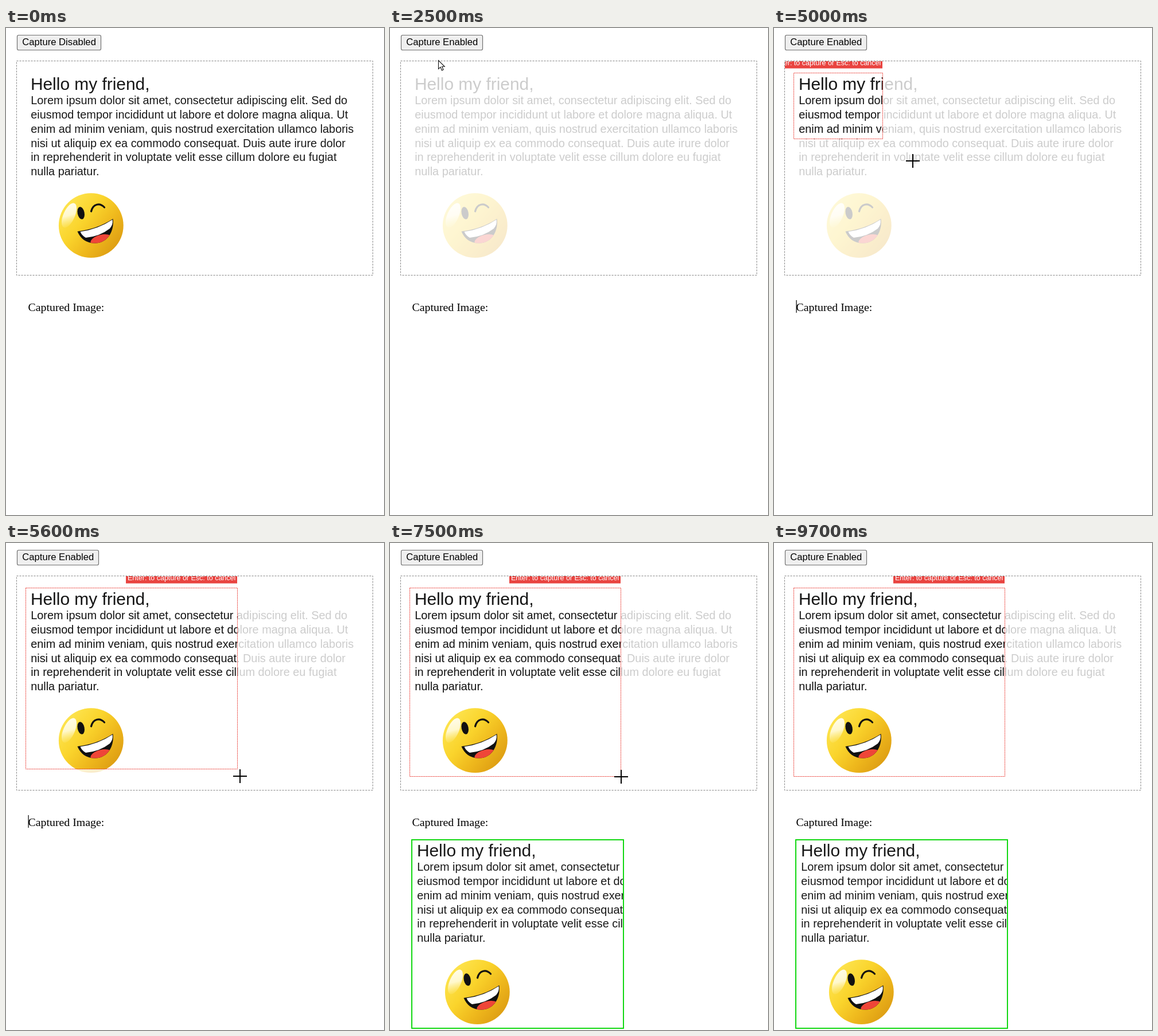
Animation of 659 by 850 pixels, one loop 9800 ms. Source, as an HTML page with a canvas:

```html
<!DOCTYPE html>
<html lang="en">
<head>
<meta charset="utf-8">
<title>Region capture</title>
<style>
  html, body { margin: 0; width: 100%; height: 100%; overflow: hidden; background: #fff; }
  canvas { display: block; }
</style>
</head>
<body>
<canvas id="stage" width="659" height="850"></canvas>
<script>
const ctx = document.getElementById('stage').getContext('2d');
const SANS = '"Liberation Sans", Arial, sans-serif';
const SERIF = '"Liberation Serif", "Times New Roman", serif';
const LOOP = 9800, STEP = 100;
const ENABLED = 2300, DRAG = 4600, CARET_OFF = 6600, CAPTURED = 7200, CROSS_OFF = 8400;
const ORIGIN = { x: 35, y: 79 };

const LINES = [
  'Lorem ipsum dolor sit amet, consectetur adipiscing elit. Sed do',
  'eiusmod tempor incididunt ut labore et dolore magna aliqua. Ut',
  'enim ad minim veniam, quis nostrud exercitation ullamco laboris',
  'nisi ut aliquip ex ea commodo consequat. Duis aute irure dolor',
  'in reprehenderit in voluptate velit esse cillum dolore eu fugiat',
  'nulla pariatur.'
];

// Pointer keys: time, x, y
const POINTER = [
  [900, 324, 474], [1100, 322, 472], [1400, 190, 200], [1700, 93, 31], [2300, 93, 31],
  [2700, 75, 80], [3100, 59, 97], [3800, 59, 97], [4200, 22, 75], [4400, 35, 79],
  [DRAG, 35, 79], [5000, 242, 232], [5400, 400, 384], [5700, 412, 418],
  [6100, 401, 404], [6300, 401, 404], [6500, 403, 408], [LOOP, 403, 408]
];

function pointerAt(t) {
  const i = Math.max(1, POINTER.findIndex(key => key[0] >= t));
  const [t0, x0, y0] = POINTER[i - 1], [t1, x1, y1] = POINTER[i];
  const k = Math.max(0, (t - t0) / (t1 - t0));
  return { x: Math.round(x0 + (x1 - x0) * k), y: Math.round(y0 + (y1 - y0) * k) };
}

function text(str, x, y, size, color = '#181818', family = SANS) {
  ctx.font = `${size}px ${family}`;
  ctx.fillStyle = color;
  ctx.fillText(str, x, y);
}

function fillPath(d, color) {
  ctx.fillStyle = color;
  ctx.fill(new Path2D(d));
}

function ellipse(x, y, rx, ry, angle, fill) {
  ctx.beginPath();
  ctx.ellipse(x, y, rx, ry, angle, 0, 2 * Math.PI);
  ctx.fillStyle = fill;
  ctx.fill();
}

function dashedRect(x, y, w, h, color, dash) {
  ctx.setLineDash(dash);
  ctx.lineWidth = 1;
  ctx.strokeStyle = color;
  ctx.strokeRect(x, y, w, h);
  ctx.setLineDash([]);
}

function clipped(x, y, w, h, draw) {
  ctx.save();
  ctx.beginPath();
  ctx.rect(x, y, w, h);
  ctx.clip();
  draw();
  ctx.restore();
}

function smiley() {
  const skin = ctx.createLinearGradient(106, 312, 190, 382);
  skin.addColorStop(0, '#fde24a');
  skin.addColorStop(0.35, '#fad42c');
  skin.addColorStop(0.7, '#eeb71c');
  skin.addColorStop(1, '#dfa014');
  ellipse(148.3, 344.7, 56.4, 56.4, 0, skin);
  const shine = ctx.createLinearGradient(102, 305, 114, 350);
  shine.addColorStop(0, '#fffdf0');
  shine.addColorStop(0.5, '#fff8cc');
  shine.addColorStop(1, '#fdec8800');
  ellipse(110, 327, 10, 23, 0.42, shine);
  ellipse(130.7, 323, 6, 11, -0.2, '#111');
  ctx.lineWidth = 3.2;
  ctx.lineCap = 'round';
  ctx.strokeStyle = '#111';
  ctx.stroke(new Path2D('M148.5 320C152 306 164 305 171.5 313'));
  ctx.lineCap = 'butt';
  const mouth = 'M124.5 355Q159 351 186.5 333C189 354 178 375 156 375.5C140 376 130 368 124.5 355Z';
  fillPath(mouth, '#111');
  ctx.save();
  ctx.clip(new Path2D(mouth));
  ellipse(166, 370, 19, 9, -0.25, '#ef4538');
  ctx.restore();
  fillPath('M129.5 355.5Q160 351.5 185.5 334.5Q187 343 181 350Q163 364 139 366Q132 362 129.5 355.5Z', '#fff');
}

function letter() {
  text('Hello my friend,', 42.9, 108, 29.9);
  LINES.forEach((line, i) => text(line, 43.2, 133 + i * 24.85, 19.86));
  smiley();
}

function button(label, width, fill) {
  ctx.beginPath();
  ctx.roundRect(19.5, 12.5, width, 26, 2.5);
  ctx.fillStyle = fill;
  ctx.fill();
  ctx.lineWidth = 1.2;
  ctx.strokeStyle = '#707070';
  ctx.stroke();
  text(label, 28.2, 30, 16.67, '#000');
}

function selection({ x, y }) {
  const w = x - ORIGIN.x, h = y - ORIGIN.y;
  clipped(ORIGIN.x, ORIGIN.y, w, h, letter);
  dashedRect(ORIGIN.x - 0.5, ORIGIN.y - 0.5, w, h, '#ea3f38', [2, 1]);
  clipped(19, 58, 620, 374, () => {
    ctx.fillStyle = '#e94440';
    ctx.fillRect(x - 195, 50, 194, 20.5);
    text('Enter: to capture or Esc: to cancel', x - 192, 65, 12.5, '#fff');
  });
}

function capturedImage() {
  ctx.save();
  ctx.translate(4, 439);
  clipped(35, 79, 368, 329, letter);
  ctx.restore();
  ctx.lineWidth = 2;
  ctx.strokeStyle = '#12d812';
  ctx.strokeRect(38, 518, 369, 329);
}

function arrow({ x, y }) {
  ctx.save();
  ctx.translate(x, y);
  const shape = new Path2D('M0.5 0.5V15.5L4 12.2L6.4 18L9 16.8L6.6 11.3H11.2Z');
  ctx.fillStyle = '#fff';
  ctx.fill(shape);
  ctx.lineWidth = 1.1;
  ctx.strokeStyle = '#111';
  ctx.stroke(shape);
  ctx.restore();
}

function crosshair({ x, y }) {
  ctx.fillStyle = '#000';
  ctx.fillRect(x - 12, y - 1, 24, 2);
  ctx.fillRect(x - 1, y - 12, 2, 24);
}

function draw(t) {
  const enabled = t >= ENABLED, pointer = pointerAt(t);
  ctx.fillStyle = '#fff';
  ctx.fillRect(0, 0, 659, 850);

  letter();
  if (enabled) {
    ctx.fillStyle = 'rgba(255,255,255,.78)';
    ctx.fillRect(19, 58, 620, 373);
  }
  dashedRect(18.5, 57.5, 621, 374, '#858585', [3, 2]);

  const hover = t >= 1700 && t < 2500;
  button(enabled ? 'Capture Enabled' : 'Capture Disabled', enabled ? 142 : 146, hover ? '#e5e5e5' : '#efefef');
  text('Captured Image:', 38.5, 494, 19.85, '#000', SERIF);

  if (t > DRAG) selection(pointerAt(t - STEP));
  if (t >= DRAG && t < CARET_OFF) {
    ctx.fillStyle = '#000';
    ctx.fillRect(38.5, 475, 1.2, 22);
  }
  if (t >= CAPTURED) capturedImage();

  if (t >= 900 && t < 2600) arrow(pointer);
  else if (t >= 2600 && t < CROSS_OFF) crosshair(pointer);
}

function tick() {
  draw(Math.floor(performance.now() % LOOP / STEP) * STEP);
  requestAnimationFrame(tick);
}
tick();
</script>
</body>
</html>
```
